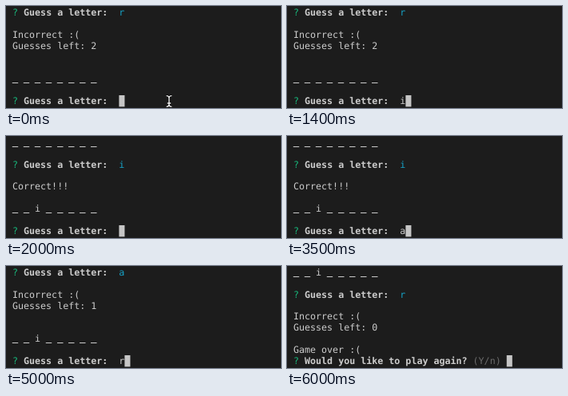
An HTML page that plays this animation: 344x128 px, repeating every 7.1 s.

```html
<!DOCTYPE html>
<html lang="en">
<head>
<meta charset="utf-8">
<title>Letter guessing game</title>
<style>
  :root {
    --bg: #1c1c1c; --fg: #cccccc; --green: #18b67a; --cyan: #16a2c6;
    --left: 8px; --col: 7.02px; --row: 13.88px;
    --loop: 7100ms step-end infinite;
  }
  html, body { margin: 0; width: 100%; height: 100%; overflow: hidden; background: var(--bg); }
  #stage { position: relative; width: 344px; height: 128px; overflow: hidden; background: var(--bg); }

  /* the tiny turn lets baselines sit between pixels */
  #screen { position: absolute; left: 0; top: 0; transform-origin: 0 0; transform: rotate(.01deg); }
  #log {
    position: absolute; left: var(--left); top: 1px;
    font: 11.66px/14px "DejaVu Sans Mono", monospace;
    color: var(--fg); text-rendering: geometricPrecision; font-variant-ligatures: none;
    animation: scroll var(--loop);
  }
  #log p { margin: 0; height: var(--row); white-space: pre; }
  #log i { font-style: normal; color: var(--green); }
  #log u { position: relative; top: -.8px; text-decoration: none; -webkit-text-stroke: .4px var(--fg); }
  #log em { font-style: normal; color: var(--cyan); }
  #log small { font-size: inherit; color: #6b6b6b; }
  #key1 { animation: key1 var(--loop); }
  #key2 { animation: key2 var(--loop); }
  #key3 { animation: key3 var(--loop); }

  #over { position: absolute; left: 0; top: 0; }
  #caret { fill: #c6c6c6; animation: caret var(--loop); }
  #mouse { fill: none; animation: mouse var(--loop); }

  /* the terminal scrolls by whole rows */
  @keyframes scroll {
    0% { top: 1px; }
    22.5352% { top: calc(1px - 6 * var(--row)); }
    53.5211% { top: calc(1px - 14 * var(--row)); }
    74.6478%, 100% { top: calc(1px - 20 * var(--row)); }
  }
  /* each key is hidden, typed plain, then echoed in cyan */
  @keyframes key1 {
    0% { color: transparent; }
    19.7183% { color: var(--fg); }
    22.5352%, 100% { color: var(--cyan); }
  }
  @keyframes key2 {
    0% { color: transparent; }
    49.2957% { color: var(--fg); }
    53.5211%, 100% { color: var(--cyan); }
  }
  @keyframes key3 {
    0% { color: transparent; }
    70.4225% { color: var(--fg); }
    74.6478%, 100% { color: var(--cyan); }
  }
  @keyframes caret {
    0%, 22.5352%, 53.5211% { x: calc(var(--left) + 19 * var(--col)); }
    19.7183%, 49.2957%, 70.4225% { x: calc(var(--left) + 20 * var(--col)); }
    74.6478%, 100% { x: calc(var(--left) + 38 * var(--col)); }
  }
  @keyframes mouse {
    0% { visibility: visible; }
    18.3098%, 100% { visibility: hidden; }
  }
</style>
</head>
<body>
<div id="stage">
  <div id="screen"><div id="log">
    <p><i>?</i> <b>Guess a letter:</b>  <em>r</em></p>
    <p></p>
    <p>Incorrect :(</p>
    <p>Guesses left: 2</p>
    <p></p>
    <p></p>
    <p><u>_ _ _ _ _ _ _ _</u></p>
    <p></p>
    <p><i>?</i> <b>Guess a letter:</b>  <em id="key1">i</em></p>
    <p></p>
    <p>Correct!!!</p>
    <p></p>
    <p><u>_ _</u> i <u>_ _ _ _ _</u></p>
    <p></p>
    <p><i>?</i> <b>Guess a letter:</b>  <em id="key2">a</em></p>
    <p></p>
    <p>Incorrect :(</p>
    <p>Guesses left: 1</p>
    <p></p>
    <p></p>
    <p><u>_ _</u> i <u>_ _ _ _ _</u></p>
    <p></p>
    <p><i>?</i> <b>Guess a letter:</b>  <em id="key3">r</em></p>
    <p></p>
    <p>Incorrect :(</p>
    <p>Guesses left: 0</p>
    <p></p>
    <p>Game over :(</p>
    <p><i>?</i> <b>Would you like to play again?</b> <small>(Y/n)</small></p>
  </div></div>
  <svg id="over" width="344" height="128">
    <defs>
      <path id="beam" d="M200.6 112.6Q204 112.6 204 115.4V123.6Q204 126.4 200.6 126.4M207.4 112.6Q204 112.6 204 115.4M204 123.6Q204 126.4 207.4 126.4M201.8 122H206.2"/>
    </defs>
    <rect id="caret" y="112" width="7.05" height="14.4"/>
    <g id="mouse">
      <use href="#beam" stroke="#000" stroke-width="2.6"/>
      <use href="#beam" stroke="#f0f0f0" stroke-width="1.4"/>
    </g>
  </svg>
</div>
</body>
</html>
```
